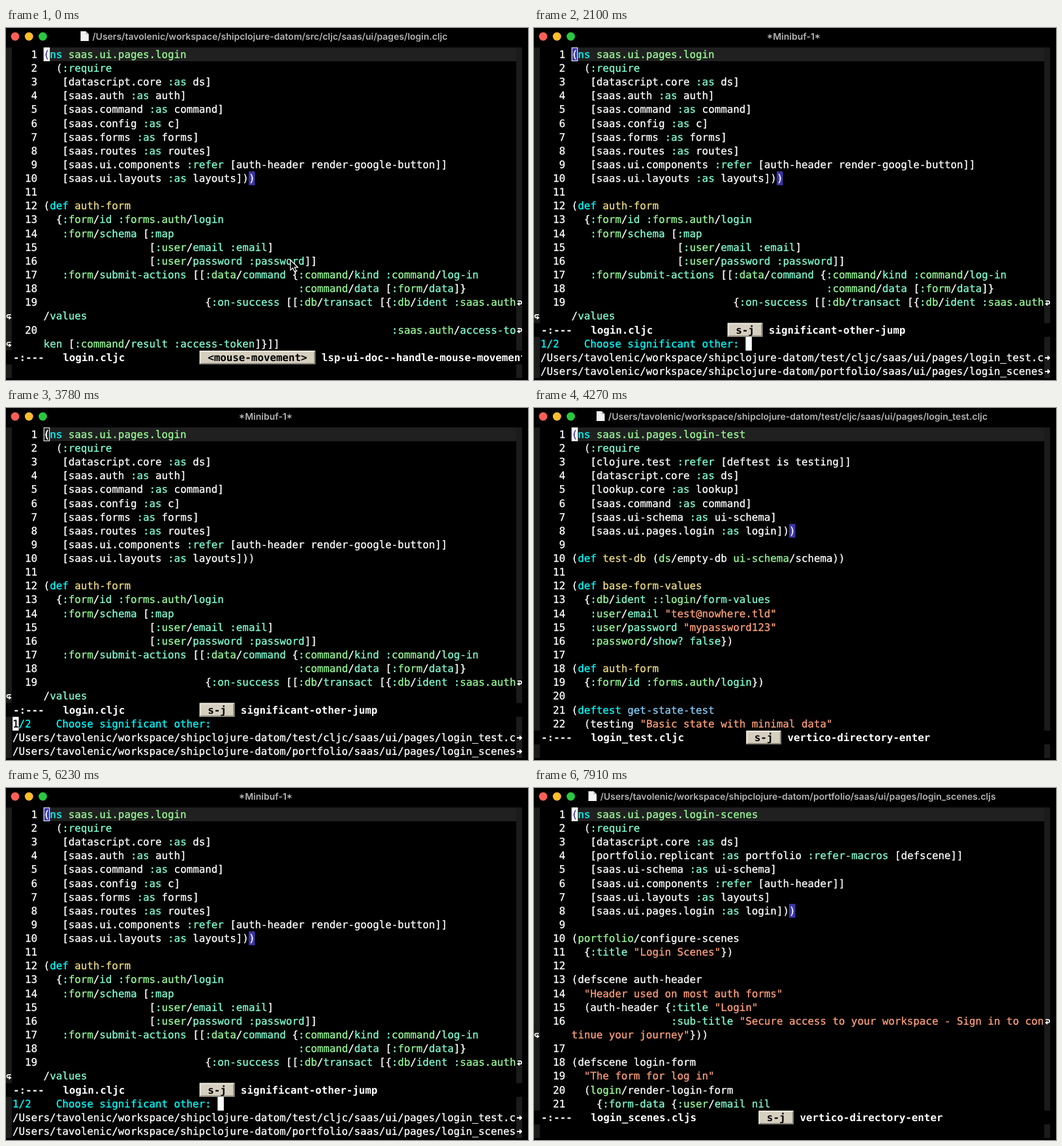
Recreate the animation shown at these times as an HTML page. Size 800 px wide and 540 px high, loop 8 s.

```html
<!DOCTYPE html>
<html lang="en">
<head>
<meta charset="utf-8">
<title>Jumping between related files</title>
<style>
  html, body { margin: 0; width: 100%; height: 100%; overflow: hidden; background: #000; }
  svg { display: block; width: 800px; height: 540px; }
  text { font: 15.82px "DejaVu Sans Mono", monospace; white-space: pre; text-rendering: geometricPrecision; }
  .code { stroke-width: .3px; }
  .bold { font-weight: bold; }
  .title { font: 600 14px Inter, sans-serif; fill: #b4b4b4; text-anchor: middle; }
</style>
</head>
<body>
<svg id="stage" viewBox="0 0 800 540"></svg>
<script>
const LOOP = 8000;
const LEFT = 10, TOP = 29.8, CW = 9.524, RH = 21.14;
const GUTTER = 5, WRAP = 76, RIGHT = 782, EDGE = 791;
const WHITE = '#fff', CYAN = '#00ffff', GREEN = '#98fb98', AQUA = '#7fffd4',
      GOLD = '#eedd82', SKY = '#87cefa', SALMON = '#ffa07a',
      MATCH = '#3a36a8', GREY = '#1b1b1b', LINE = '#202020';
const ROOT = '/Users/tavolenic/workspace/shipclojure-datom/';

const pages = {
  login: { path: 'src/cljc/saas/ui/pages/login.cljc', code: `
(ns saas.ui.pages.login
  (:require
   [datascript.core :as ds]
   [saas.auth :as auth]
   [saas.command :as command]
   [saas.config :as c]
   [saas.forms :as forms]
   [saas.routes :as routes]
   [saas.ui.components :refer [auth-header render-google-button]]
   [saas.ui.layouts :as layouts]))

(def auth-form
  {:form/id :forms.auth/login
   :form/schema [:map
                 [:user/email :email]
                 [:user/password :password]]
   :form/submit-actions [[:data/command {:command/kind :command/log-in
                                         :command/data [:form/data]}
                          {:on-success [[:db/transact [{:db/ident :saas.auth/values
                                                        :saas.auth/access-token [:command/result :access-token]}]]` },
  test: { path: 'test/cljc/saas/ui/pages/login_test.cljc', code: `
(ns saas.ui.pages.login-test
  (:require
   [clojure.test :refer [deftest is testing]]
   [datascript.core :as ds]
   [lookup.core :as lookup]
   [saas.command :as command]
   [saas.ui-schema :as ui-schema]
   [saas.ui.pages.login :as login]))

(def test-db (ds/empty-db ui-schema/schema))

(def base-form-values
  {:db/ident ::login/form-values
   :user/email "test@nowhere.tld"
   :user/password "mypassword123"
   :password/show? false})

(def auth-form
  {:form/id :forms.auth/login})

(deftest get-state-test
  (testing "Basic state with minimal data"` },
  scenes: { path: 'portfolio/saas/ui/pages/login_scenes.cljs', code: `
(ns saas.ui.pages.login-scenes
  (:require
   [datascript.core :as ds]
   [portfolio.replicant :as portfolio :refer-macros [defscene]]
   [saas.ui-schema :as ui-schema]
   [saas.ui.components :refer [auth-header]]
   [saas.ui.layouts :as layouts]
   [saas.ui.pages.login :as login]))

(portfolio/configure-scenes
  {:title "Login Scenes"})

(defscene auth-header
  "Header used on most auth forms"
  (auth-header {:title "Login"
                :sub-title "Secure access to your workspace - Sign in to continue your journey"}))

(defscene login-form
  "The form for log in"
  (login/render-login-form
    {:form-data {:user/email nil` }
};

// Each rule colours its consecutive groups in turn.
const rules = [
  [/(\()(ns)( )([\w.-]+)/g, [WHITE, CYAN, WHITE, GREEN]],
  [/(\()(def)( )([\w-]+)/g, [WHITE, CYAN, WHITE, GOLD]],
  [/(\()(deftest)( )([\w-]+)/g, [WHITE, CYAN, WHITE, SKY]],
  [/(?<![:\w.-])([\w-]+)(\/)/g, [GREEN, WHITE]],
  [/(::?)([\w.-]+)(\/)([\w?-]+)/g, [AQUA, GREEN, WHITE, AQUA]],
  [/(?<![:\w])(:[\w-]+)(?![\w.\/-])/g, [AQUA]],
  [/\b(nil|false)\b/g, [AQUA]],
  [/("[^"]*")/g, [SALMON]]
];

const mouse = ['<mouse-movement>', 'lsp-ui-doc--handle-mouse-movement'];
const jump = ['s-j', 'significant-other-jump'];
const enter = ['s-j', 'vertico-directory-enter'];
const next = ['C-n', 'vertico-next'];

const steps = [
  { at: 0, page: 'login', keys: mouse, paren: true, pointer: true },
  { at: 2100, page: 'login', keys: jump, paren: true, pick: 1 },
  { at: 2240, page: 'login', keys: jump, pick: 1 },
  { at: 3780, page: 'login', keys: jump, pick: 1, home: true },
  { at: 3850, page: 'test', keys: enter },
  { at: 3990, page: 'test', keys: enter, paren: true },
  { at: 4830, page: 'login', keys: jump },
  { at: 4970, page: 'login', keys: jump, paren: true },
  { at: 6160, page: 'login', keys: jump, paren: true, pick: 1 },
  { at: 6300, page: 'login', keys: jump, pick: 1 },
  { at: 6930, page: 'login', keys: next, pick: 2 },
  { at: 7280, page: 'login', keys: next, pick: 2, home: true },
  { at: 7350, page: 'scenes', keys: enter },
  { at: 7490, page: 'scenes', keys: enter, paren: true }
];

const colX = col => LEFT + col * CW;
const rowY = row => TOP + row * RH;
const escapeXml = s => s.replace(/&/g, '&amp;').replace(/</g, '&lt;');
const rect = (x, y, w, h, fill, extra = '') =>
  `<rect x="${x}" y="${y}" width="${w}" height="${h}" fill="${fill}" ${extra}/>`;
const path = (d, fill, extra = '') => `<path d="${d}" fill="${fill}" ${extra}/>`;
const text = (x, row, str, fill = WHITE, cls = 'code') =>
  `<text x="${x}" y="${rowY(row) + 16}" fill="${fill}" class="${cls}"` +
  `${cls === 'code' ? ` stroke="${fill}"` : ''}>${escapeXml(str)}</text>`;
const cell = (col, row, fill) => rect(colX(col), rowY(row), CW, RH, fill);

function coloursOf(line) {
  const colours = Array(line.length).fill(WHITE);
  for (const [pattern, palette] of rules) {
    for (const match of line.matchAll(pattern)) {
      let i = match.index;
      palette.forEach((colour, g) => {
        colours.fill(colour, i, i += match[g + 1].length);
      });
    }
  }
  return colours;
}

function codeRow(str, colours, row) {
  let out = '';
  for (let i = 0, j; i < str.length; i = j) {
    for (j = i + 1; j < str.length && colours[j] === colours[i]; j++);
    out += text(colX(GUTTER + i), row, str.slice(i, j), colours[i]);
  }
  return out;
}

// Curled marks in the fringes show where a long line wraps.
function wrapMark(x, row, flip) {
  const y = rowY(row) + 12;
  return `<g transform="translate(${x} ${y}) scale(${flip} 1)">` +
    path('M-3 -3.5H1Q3 -3.5 3 -1.2T1 1H-1', 'none', 'stroke="#fff" stroke-width="1.7"') +
    path('M-4 1L0 -2V4Z', WHITE) + '</g>';
}

function codeView(page, rows) {
  let out = '', row = 0;
  page.code.trim().split('\n').forEach((line, n) => {
    const colours = coloursOf(line);
    for (let i = 0; i === 0 || i < line.length; i += WRAP, row++) {
      if (row >= rows) return;
      if (i === 0) out += text(colX(2), row, String(n + 1).padStart(2));
      else out += wrapMark(4.5, row, -1);
      if (i + WRAP < line.length) out += wrapMark(787, row, 1);
      out += codeRow(line.slice(i, i + WRAP), colours.slice(i, i + WRAP), row);
    }
  });
  return out;
}

function pointCursor(step, page) {
  const x = colX(GUTTER), y = rowY(0);
  let out = '';
  if (step.paren) {
    const lines = page.code.trim().split('\n');
    const row = lines.indexOf('') - 1, col = GUTTER + lines[row].length - 1;
    out += cell(col, row, MATCH) + text(colX(col), row, ')');
    if (step.pick) out += cell(GUTTER, 0, MATCH);
  }
  if (step.pick) {
    return out + text(x, 0, '(') +
      rect(x + .5, y + .5, CW - 1, RH - 1, 'none', 'stroke="#fff"');
  }
  return out + cell(GUTTER, 0, WHITE) + text(x, 0, '(', step.paren ? MATCH : '#000');
}

function modeLine(row, file, [key, command]) {
  const x = colX(18 + Math.max(12, file.length)) + 1, y = rowY(row);
  const w = (key.length + 2) * CW + 6, r = x + w, b = y + RH;
  return rect(0, y, 800, RH, '#000') +
    text(LEFT + 1, row, '-:---   ' + file, WHITE, 'bold') +
    rect(x, y, w, RH, '#d5cfbf') +
    path(`M${x} ${b}V${y}H${r}l-2 2H${x + 2}V${b - 2}Z`, '#ece8dc') +
    path(`M${x} ${b}H${r}V${y}l-2 2V${b - 2}H${x + 2}Z`, '#88847a') +
    text(x + CW + 3, row, key, '#000', 'bold') +
    text(r + CW, row, command, WHITE, 'bold');
}

function minibuffer(step) {
  const prompt = `${step.pick}/2    Choose significant other: `;
  const col = step.home ? 0 : prompt.length;
  let out = text(LEFT, 21, prompt, CYAN) + cell(col, 21, WHITE);
  if (step.home) out += text(LEFT, 21, prompt[0], '#000');
  [pages.test, pages.scenes].forEach((page, i) => {
    const y = rowY(22 + i) + 11;
    out += text(LEFT, 22 + i, (ROOT + page.path).slice(0, GUTTER + WRAP)) +
      path(`M783 ${y - 1}h4v-3l4.5 4l-4.5 4v-3h-4z`, WHITE);
  });
  return out;
}

function titleBar(title) {
  const lights = ['#ff5f57', '#febc2e', '#28c840'];
  return lights.map((c, i) => `<circle cx="${14 + i * 21.2}" cy="13" r="6.4" fill="${c}"/>`).join('') +
    `<text id="title" class="title" x="${title[0] === '*' ? 398 : 404.5}" y="17.5">${title}</text>`;
}

function draw(step) {
  const page = pages[step.page], file = page.path.split('/').pop();
  const rows = step.pick ? 20 : 22;
  const stage = document.getElementById('stage');
  stage.innerHTML = rect(0, 0, 800, 540, '#000') +
    rect(0, TOP, LEFT - 1, 24 * RH, GREY) + rect(RIGHT, TOP, EDGE - RIGHT, 24 * RH, GREY) +
    rect(colX(GUTTER), TOP, RIGHT - colX(GUTTER), RH, LINE) +
    titleBar(step.pick ? '*Minibuf-1*' : ROOT + page.path) +
    codeView(page, rows) + pointCursor(step, page) +
    modeLine(rows, file, step.keys) +
    (step.pick ? minibuffer(step) : '') +
    rect(EDGE, TOP, 800 - EDGE, 540 - TOP, '#000') +
    (step.pointer ? path('M436 356v15.5l3.6-3.3 2.5 5.6 2.7-1.2-2.5-5.4h5z', '#000',
      'stroke="#fff" stroke-width="1.2"') : '');
  if (!step.pick) {
    const x = 404.5 - document.getElementById('title').getComputedTextLength() / 2 - 18;
    stage.insertAdjacentHTML('beforeend',
      path(`M${x} 5h8l4.5 4.5V20h-12.5z`, '#f2f2f2') + path(`M${x + 8} 5v4.5h4.5z`, '#b4b4b4'));
  }
}

const start = performance.now();
let shown;
function tick() {
  const t = (performance.now() - start) % LOOP;
  const step = steps.findLast(s => s.at <= t) || steps[0];
  if (step !== shown) draw(shown = step);
  requestAnimationFrame(tick);
}
tick();
</script>
</body>
</html>
```
